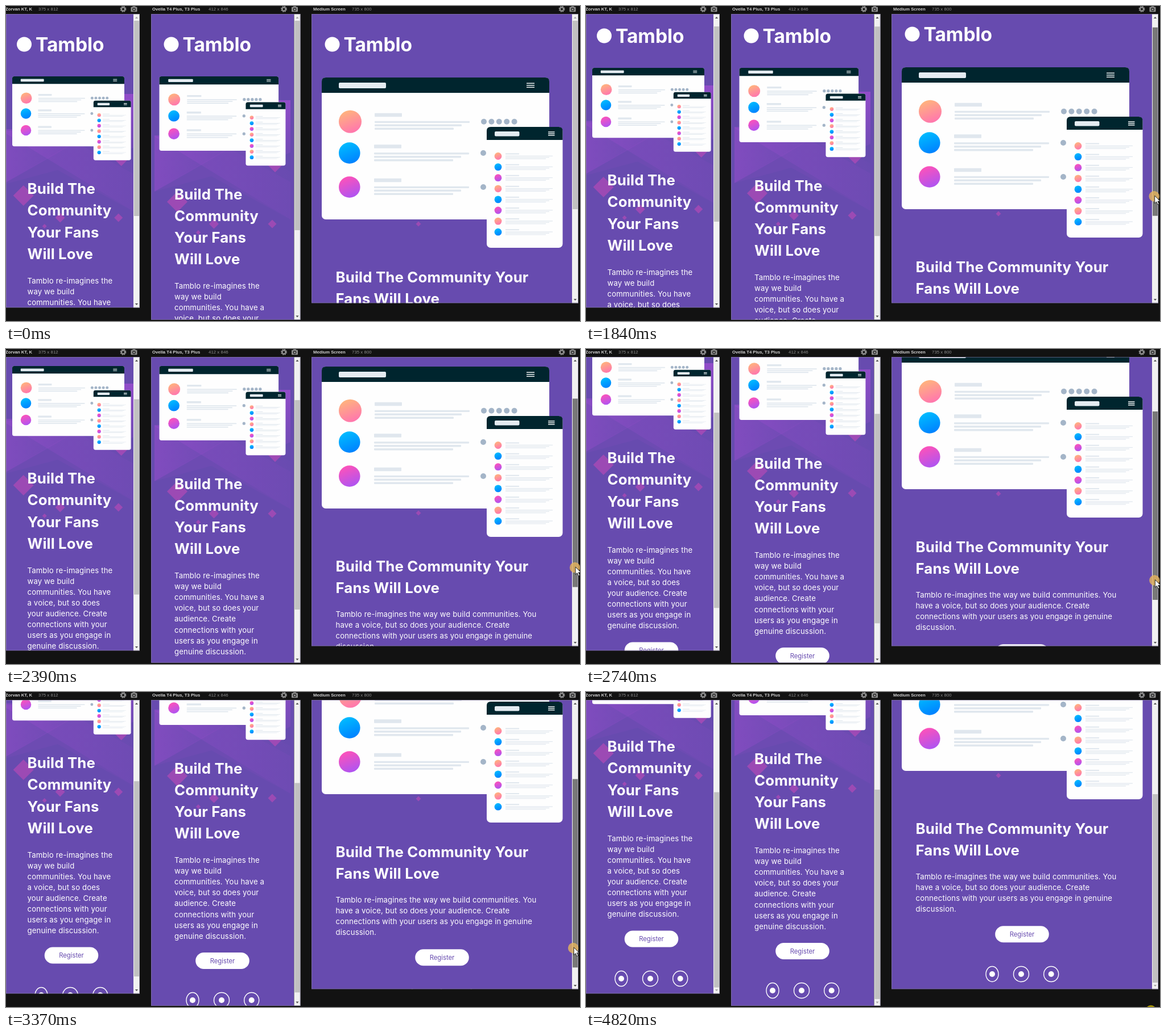
Write an HTML page that moves like this. It is 1009 px wide and 555 px high and loops after 4950 ms.

```html
<!DOCTYPE html>
<html lang="en">
<head>
<meta charset="utf-8">
<title>Responsive preview</title>
<style>
  html, body { margin: 0; width: 100%; height: 100%; overflow: hidden; background: #121212; }
  svg { display: block; }
  text { font-family: Inter, "Open Sans", sans-serif; font-optical-sizing: none; fill: #fff; white-space: pre; }
  .brand { font-size: 33.5px; font-weight: 700; }
  .title { font-size: 25.8px; font-weight: 700; letter-spacing: .15px; }
  .body { font-size: 13.2px; letter-spacing: .12px; }
  .btn { font-size: 11.3px; fill: #674baf; text-anchor: middle; }
  .name, .size { font: 7.9px "Liberation Sans", Arial, sans-serif; fill: #8c8c8c; }
  .name { font-weight: 700; font-size: 7.7px; fill: #d2d2d2; }
</style>
</head>
<body>
<svg id="stage" width="1009" height="555" viewBox="0 0 1009 555"></svg>
<script>
const LOOP = 4950;
const TOP = 14;
const BRAND = 'Tamblo';
const stage = document.getElementById('stage');

const NARROW_TITLE = ['Build The', 'Community', 'Your Fans', 'Will Love'];
const panels = [
  {
    x: 0, w: 224, bottom: 531.5, label: 'Zorvan KT, K', labelX: -1, size: '375 x 812', sizeX: 57,
    tools: 206, brandX: 17, brandY: 80, art: [11, 124, .4925], pattern: [-9.3, -11],
    textX: 37.5, title: NARROW_TITLE, titleY: 331,
    body: [BRAND + ' re-imagines the', 'way we build', 'communities. You have', 'a voice, but so does',
      'your audience. Create', 'connections with your', 'users as you engage in', 'genuine discussion.'],
    bodyY: 488.5, button: [115, 661], social: [113, 731], thumb: 344, ratio: .666, max: 226
  },
  {
    x: 255, w: 251.5, bottom: 553, label: 'Ovella T4 Plus, T3 Plus', labelX: 257, size: '412 x 846', sizeX: 356,
    tools: 488.5, brandX: 275.5, brandY: 80, art: [269.5, 124, .524], pattern: [261, 0],
    textX: 296, title: NARROW_TITLE, titleY: 340.5,
    body: [BRAND + ' re-imagines the', 'way we build', 'communities. You have a', 'voice, but so does your',
      'audience. Create', 'connections with your', 'users as you engage in', 'genuine discussion.'],
    bodyY: 498, button: [380.5, 670.6], social: [379, 740], thumb: 369, ratio: .682, max: 214
  },
  {
    x: 537, w: 458, bottom: 523.5, label: 'Medium Screen', labelX: 540, size: '735 x 800', sizeX: 608,
    tools: 977, brandX: 558.5, brandY: 80, art: [555, 126, 1],
    textX: 579.5, title: ['Build The Community Your', 'Fans Will Love'], titleY: 487,
    body: [BRAND + ' re-imagines the way we build communities. You', 'have a voice, but so does your audience. Create',
      'connections with your users as you engage in genuine', 'discussion.'],
    bodyY: 567, button: [766.5, 663.8], social: [765, 734], thumb: 332, ratio: .65, max: 237
  }
];

const rect = (x, y, w, h, fill, r = 0) =>
  `<rect x="${x}" y="${y}" width="${w}" height="${h}" rx="${r}" fill="${fill}"/>`;
const dot = (x, y, r, fill) => `<circle cx="${x}" cy="${y}" r="${r}" fill="${fill}"/>`;
const label = (x, y, cls, s) => `<text x="${x}" y="${y}" class="${cls}">${s}</text>`;
const lines = (list, x, y, step, cls) => list.map((s, i) => label(x, y + i * step, cls, s)).join('');
const poly = (points, fill, opacity) => `<polygon points="${points}" fill="${fill}" opacity="${opacity}"/>`;
const diamond = (x, y, d) =>
  poly(`${x - d},${y} ${x},${y - d} ${x + d},${y} ${x},${y + d}`, '#c84ab8', .55);
const burger = (x, y, w, gap) => [0, 1, 2].map(i => rect(x, y + i * gap, w, 1.4, '#fff')).join('');

function gradient(id, from, to) {
  return `<linearGradient id="${id}" x1=".3" y1="0" x2=".7" y2="1">
    <stop stop-color="${from}"/><stop offset="1" stop-color="${to}"/></linearGradient>`;
}

function fade(id, x2, y2) {
  return `<linearGradient id="${id}" x2="${x2}" y2="${y2}"><stop stop-color="#a04dd2"/>
    <stop offset="1" stop-color="#a04dd2" stop-opacity=".1"/></linearGradient>`;
}

const HUES = ['url(#peach)', 'url(#sky)', 'url(#pink)'];
const PALE = '#e0e7ee';

// A window with a dark rounded header.
function frame(x, y, w, h, head) {
  return rect(x, y, w, h, '#fefefe', 7) +
    `<path d="M${x} ${y + head}v${7 - head}q0-7 7-7h${w - 14}q7 0 7 7v${head - 7}z" fill="#00252e"/>`;
}

function artwork() {
  let s = frame(0, 0, 400, 250, 27) + rect(30, 9, 83, 10, '#e4ebf1', 2) + burger(360, 9.5, 14, 3.5);
  [[50, 77.7, 20, 66], [48.8, 133, 18.8, 121.5], [48.8, 193, 18.8, 181]].forEach(([cx, cy, r, y], row) => {
    const x = row ? 92 : 93;
    s += dot(cx, cy, r, HUES[row]) + rect(x, y - 3.2, 48, 6.5, PALE, 1);
    for (let i = 0; i < 3; i++) s += rect(x, y + 10.7 + i * 5.9, 167 - i * 14, 3.4, PALE, 1);
    for (let i = 0; i < 5; i++) s += dot((row ? 284 : 285) + i * 13.4, cy, 5, '#a4b5c8');
  });
  s += frame(290, 87, 133.5, 213, 23) + rect(304, 95, 43.5, 8.5, '#e4ebf1', 2) + burger(398, 95.3, 11.5, 2.9);
  for (let i = 0; i < 8; i++) {
    const y = 138.5 + i * 19.1;
    s += dot(310, y, 6.4, HUES[i % 3]) + rect(323, y - 5, 24, 2, PALE);
    for (let k = 0; k < 3; k++) s += rect(323, y - .8 + k * 2.4, 83 - k * 6, 1.2, PALE);
  }
  return s;
}

function pattern() {
  return `<svg width="239" height="500">` +
    poly('150,166 239,166 239,258 190,280', 'url(#fadeDown)', .75) +
    poly('0,228 0,327 135,250 40,228', 'url(#fadeRight)', .45) +
    poly('0,230 239,376 239,292 120,235', 'url(#fadeRight)', .34) +
    poly('0,327 130,250 239,310 239,376 100,300', '#9a50cc', .1) +
    diamond(40, 345, 18) + diamond(104.5, 384, 8.5) + diamond(207, 384, 7.5) +
    diamond(77, 399, 4) + diamond(212, 281, 12) + '</svg>';
}

function page(p) {
  const [ax, ay, scale] = p.art;
  const [bx, by] = p.button;
  const [sx, sy] = p.social;
  let s = p.pattern ? `<g transform="translate(${p.pattern})">${pattern()}</g>` : diamond(725, 384, 4.5);
  s += dot(p.brandX + 15, 67.5, 13, '#fff') + label(p.brandX + 35, p.brandY, 'brand', BRAND);
  s += `<g transform="translate(${ax} ${ay}) scale(${scale})">${artwork()}</g>`;
  s += lines(p.title, p.textX, p.titleY, 38.3, 'title') + lines(p.body, p.textX, p.bodyY, 19.1, 'body');
  s += rect(bx - 47.3, by - 14.5, 94.6, 29, '#fff', 14.5) + label(bx, by + 4, 'btn', 'Register');
  [[-51, 11], [0, 13.5], [52.7, 13]].forEach(([dx, rx]) => {
    s += `<ellipse cx="${sx + dx}" cy="${sy}" rx="${rx}" ry="13.5" fill="none" stroke="#fff" stroke-width="1.4"/>` +
      dot(sx + dx, sy, 5, '#fff');
  });
  return s;
}

function tools(x) {
  return `<g fill="none" stroke="#8d8d8d"><circle cx="${x}" cy="5.5" r="3.1" stroke-width="2.4"/>
    <circle cx="${x}" cy="5.5" r="4.6" stroke-width="1.7" stroke-dasharray="2.2 1.41"/></g>` +
    rect(x + 13.5, 1.8, 11, 8.4, '#8d8d8d', 1) + rect(x + 16.5, .5, 5, 2, '#8d8d8d') +
    `<circle cx="${x + 19}" cy="6" r="2.4" fill="#8d8d8d" stroke="#1c1c1c" stroke-width="1.1"/>`;
}

function panel(p) {
  const h = p.bottom - TOP, bar = p.x + p.w, mid = bar + 5.5;
  return label(p.labelX, 8, 'name', p.label) + label(p.sizeX, 8, 'size', p.size) + tools(p.tools) +
    `<svg x="${p.x}" y="${TOP}" width="${p.w}" height="${h}" viewBox="${p.x} ${TOP} ${p.w} ${h}">
      ${rect(p.x, TOP, p.w, h, '#674baf')}<g class="page">${page(p)}</g></svg>` +
    rect(bar, TOP, 11, h, '#f1f1f1') +
    `<rect class="thumb" x="${bar + 1}" width="9.2" height="${p.thumb}"/>
     <path class="up" d="M${mid - 2.6} 22h5.2l-2.6-3z"/>
     <path class="down" d="M${mid - 2.6} ${p.bottom - 7.5}h5.2l-2.6 3z"/>
     <rect x="${p.x + .5}" y="${TOP + .5}" width="${p.w + 10}" height="${h - 1}" fill="none" stroke="#8a7fa8" stroke-opacity=".6"/>`;
}

stage.innerHTML = `<defs>
    ${gradient('peach', '#ffb57c', '#ff74b0')}${gradient('sky', '#00bdff', '#0080ff')}${gradient('pink', '#ff52b8', '#ac54f4')}
    ${fade('fadeDown', 0, 1)}${fade('fadeRight', 1, 0)}</defs>` +
  rect(0, 0, 1009, 555, '#121212') + panels.map(p => `<g class="panel">${panel(p)}</g>`).join('') +
  `<g id="handle">${rect(1006, 261, 3, 16, '#4a4a4a', 1)}<path d="M1009 266.5l-1.6 2.5 1.6 2.5" stroke="#ccc" fill="none"/></g>
   <path id="resize" d="M1000.5 318l4-3.6v2.4h5v2.4h-5v2.4z" fill="#111" stroke="#fff" stroke-width=".9"/>
   <g id="pointer"><circle id="halo" r="9.2"/>
     <path d="M1 -1v13.5l3.1-2.8 2.2 5 2.3-1-2.2-4.9h4.2z" fill="#fff" stroke="#111" stroke-width=".9"/></g>`;

const views = [...stage.querySelectorAll('.panel')].map((g, i) => ({
  p: panels[i],
  page: g.querySelector('.page'),
  thumb: g.querySelector('.thumb'),
  up: g.querySelector('.up'),
  down: g.querySelector('.down')
}));
const [handle, resize, pointer, halo] = ['handle', 'resize', 'pointer', 'halo'].map(id => document.getElementById(id));

// Linear interpolation through [time, value] keys.
function track(keys, t) {
  if (t <= keys[0][0]) return keys[0][1];
  for (let i = 1; i < keys.length; i++) {
    const [t0, a] = keys[i - 1], [t1, b] = keys[i];
    if (t < t1) return a + (b - a) * (t - t0) / (t1 - t0);
  }
  return keys[keys.length - 1][1];
}

const SCROLL = [[1420, 0], [1560, 2], [1630, 4.5], [1700, 8], [1770, 13], [1840, 18], [2390, 94.5],
  [3090, 164], [3650, 228], [3730, 237]];
const FOLLOW = [[1630, 0], [1700, 4], [1770, 9], [1840, 15], [2390, 94], [3090, 165], [3650, 229]];
const POINTER_X = [[190, 982], [470, 1007], [1160, 1004], [1400, 999], [1840, 998.7], [2390, 1000], [3090, 998.7],
  [3650, 995.5], [4620, 993]];
const LEAVE_Y = [[3650, 469.5], [3860, 478], [4060, 488], [4410, 530], [4620, 561]];
const ENTER_Y = [[190, 518], [470, 272], [1160, 318], [1400, 323.5]];

const between = (t, a, b) => t >= a && t < b;
const show = (el, on) => el.setAttribute('visibility', on ? 'visible' : 'hidden');

function hold(t) {
  const base = t < 700 ? 190 : t < 2040 ? 1700 : 2250;
  return base + Math.floor((t - base) / 70) * 70;
}

function draw(time) {
  const t = hold(time);
  const dragging = between(t, 1490, 4000);
  views.forEach(({ p, page, thumb, up, down }, i) => {
    const scroll = Math.min(p.max, track(i === 2 ? SCROLL : FOLLOW, t));
    page.setAttribute('transform', `translate(0 ${-Math.round(scroll)})`);
    thumb.setAttribute('y', 26 + scroll * p.ratio);
    thumb.setAttribute('fill', i === 2 && dragging ? '#787878' : '#c1c1c1');
    up.setAttribute('fill', scroll > 0 ? '#505050' : '#a3a3a3');
    down.setAttribute('fill', scroll < p.max ? '#505050' : '#a3a3a3');
  });

  const x = track(POINTER_X, t);
  const y = t < 1400 ? track(ENTER_Y, t)
    : t < 3650 ? 323.5 + track(SCROLL, t) * .65
    : track(LEAVE_Y, t);
  pointer.setAttribute('transform', `translate(${x} ${y})`);
  halo.setAttribute('fill', dragging ? '#e6b45c' : '#ffe100');
  halo.setAttribute('opacity', dragging ? .8 : .6);
  show(pointer, between(time, 190, 470) || time >= 1160);
  show(resize, between(time, 1010, 1160));
  show(handle, between(time, 400, 740) || between(time, 1010, 1230));
}

const start = performance.now();
function tick() {
  draw((performance.now() - start) % LOOP);
  requestAnimationFrame(tick);
}
tick();
</script>
</body>
</html>
```
